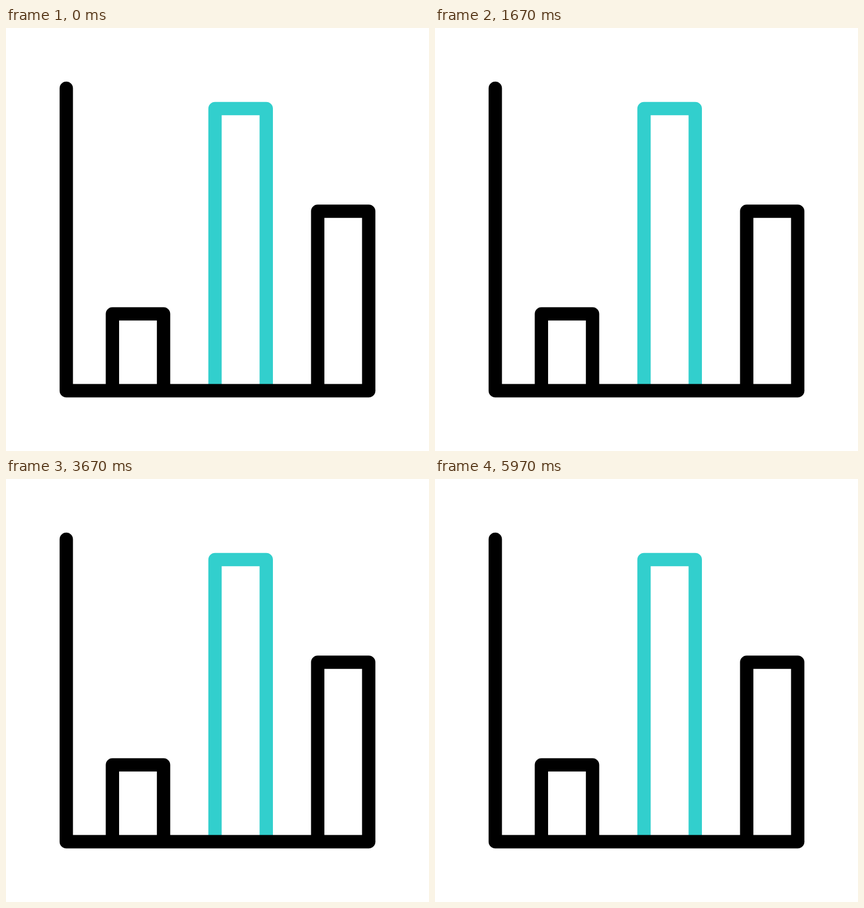
An HTML page for the animation above (6.01 s loop, 748x748 px).

```html
<!DOCTYPE html>
<html lang="en">
<head>
<meta charset="utf-8">
<title>Bar chart</title>
<style>
  html, body { margin: 0; width: 100%; height: 100%; overflow: hidden; background: #fff; }
  svg { display: block; width: 100%; height: 100%; }
  path { fill: none; stroke: #000; stroke-width: 23.6; stroke-linejoin: round; }
</style>
</head>
<body>
<svg viewBox="0 0 748 748">
  <path class="bar"/>
  <path class="bar" style="stroke:#32cfcd"/>
  <path class="bar"/>
  <path d="M106.6 106.6V641.4H641.4" stroke-linecap="round"/>
</svg>
<script>
const LOOP = 6010, FRAMES = 180, CYCLE = 60;
const BASE = 641.4, HALF = 11.8;

// Key poses, in frames of one cycle.
const keys = [2, 14, 25, 35, 47];

// Leg centres, outer top edge and sideways lean of the top at each key.
const bars = [
  { left: 188.2, right: 278.6, tops: [493.7, 565, 290, 238.7, 493.7], lean: [0, -0.2, -0.5, -0.5, 0] },
  { left: 369.6, right: 460.2, tops: [130.7, 422, 281, 395, 130.7], lean: [0, -0.5, -2, -2, 0] },
  { left: 551.2, right: 641.4, tops: [312.2, 166.7, 302, 140, 312.2], lean: [0, 1, 1.7, 1.7, 0] }
];
const paths = document.querySelectorAll('.bar');

const ease = u => u * u * (3 - 2 * u);

function valueAt(values, frame) {
  if (frame <= keys[0]) return values[0];
  for (let i = 1; i < keys.length; i++) {
    if (frame <= keys[i]) {
      const u = (frame - keys[i - 1]) / (keys[i] - keys[i - 1]);
      return values[i - 1] + (values[i] - values[i - 1]) * ease(u);
    }
  }
  return values[values.length - 1];
}

// Frame starts fall on whole hundredths of a second.
function frameAt(ms) {
  const end = Math.floor((ms % LOOP) / 10) * 10 + 10;
  return Math.min(FRAMES - 1, Math.ceil(end * FRAMES / LOOP) - 1);
}

function draw(ms) {
  const frame = frameAt(ms) % CYCLE;
  bars.forEach(({ left, right, tops, lean }, i) => {
    const y = valueAt(tops, frame) + HALF;
    const dx = valueAt(lean, frame);
    paths[i].setAttribute('d',
      `M${left} ${BASE}L${left + dx} ${y}H${right + dx}L${right} ${BASE}`);
  });
}

let start;
function tick(now) {
  start ??= now;
  draw(Math.max(0, now - start));
  requestAnimationFrame(tick);
}
draw(0);
requestAnimationFrame(tick);
</script>
</body>
</html>
```
